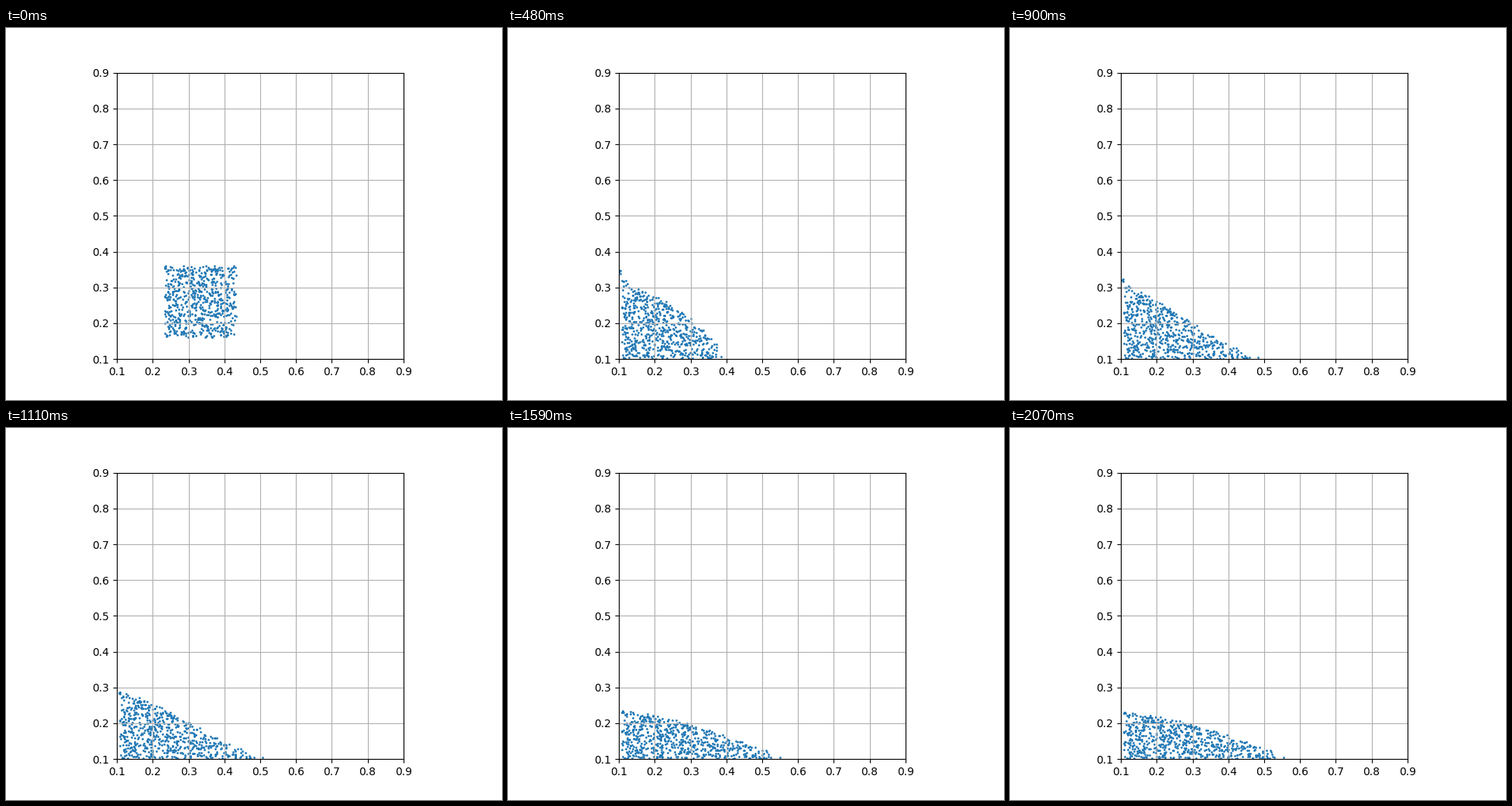
Write a matplotlib script that moves like this. It is 640 px wide and 480 px high and loops after 2.1 s.

```python
import numpy as np
import matplotlib.pyplot as plt
from matplotlib.animation import FuncAnimation

FRAMES, INTERVAL = 70, 30
COUNT, SIDE = 640, 0.2
START = np.array([0.2325, 0.16])
DRIFT, FALL = -0.0112, 0.00057   # sideways speed and half gravity, per frame
IMPACT, SETTLE = 10, 5           # landing, and frames until the block is a pile
CORNER = np.array([0.108, 0.1])  # where the wall meets the floor

rng = np.random.default_rng(3)
u, v = rng.random((2, COUNT))
grains = np.column_stack([u, v])

# Each grain sits on a ray from the corner: depth along it, turn around it.
depth = np.maximum(u, v)
turn = np.where(u >= v, v / (2 * depth), 1 - u / (2 * depth))


def block(t):
    """Square of grains in free flight, squashed once it meets wall and floor."""
    low = START + [DRIFT * t, -FALL * t * t]
    corner = np.maximum(low, CORNER)
    return corner + grains * (low + SIDE - corner)


def surface(t):
    """Outline of the pile from the toe up to the wall, seen from the corner."""
    age = t - 16
    slump = 1 / (1 + np.exp((t - 41) / 4))
    toe = 0.468 - 0.18 * np.exp(-age / 9.5)
    height = 0.131 + 0.074 * slump
    hollow = max(0.4, 1 + slump * (1.1 - 1.35 * np.exp(-age / 6)))
    splash = 0.066 * np.exp(-((t - 21) / 9.5) ** 2)
    q = np.linspace(1, 0, 200)
    x = toe * q
    y = height * (1 - q ** 1.5) ** hollow + splash * np.exp(-x / 0.012)
    return x, y


def pile(t):
    """Spread the grains evenly under the surface, ray by ray."""
    x, y = surface(t)
    area = np.append(0, np.cumsum(x[:-1] * y[1:] - y[:-1] * x[1:]))
    area /= area[-1]
    rim = np.column_stack([np.interp(turn, area, c) for c in (x, y)])
    pos = CORNER + depth[:, None] * rim
    # the splash leans onto the wall
    lift = np.clip(pos[:, 1] - 0.26, 0, None)
    pos[:, 0] -= 0.13 * lift * np.exp((0.1 - pos[:, 0]) / 0.02)
    return pos


def positions(t):
    s = np.clip((t - IMPACT) / SETTLE, 0, 1)
    ease = s * s * (3 - 2 * s)
    return (1 - ease) * block(t) + ease * pile(t)


fig, ax = plt.subplots(figsize=(6.4, 4.8), dpi=100)
ax.set_aspect("equal")
ax.set_xlim(0.1, 0.9)
ax.set_ylim(0.1, 0.9)
ticks = np.linspace(0.1, 0.9, 9)
ax.set_xticks(ticks)
ax.set_yticks(ticks)
ax.grid(True)
dots = ax.scatter(*positions(0).T, s=1, color="tab:blue")


def update(frame):
    dots.set_offsets(positions(frame))
    return dots,


anim = FuncAnimation(fig, update, frames=FRAMES, interval=INTERVAL,
                     repeat=True, repeat_delay=0)
plt.show()
```
